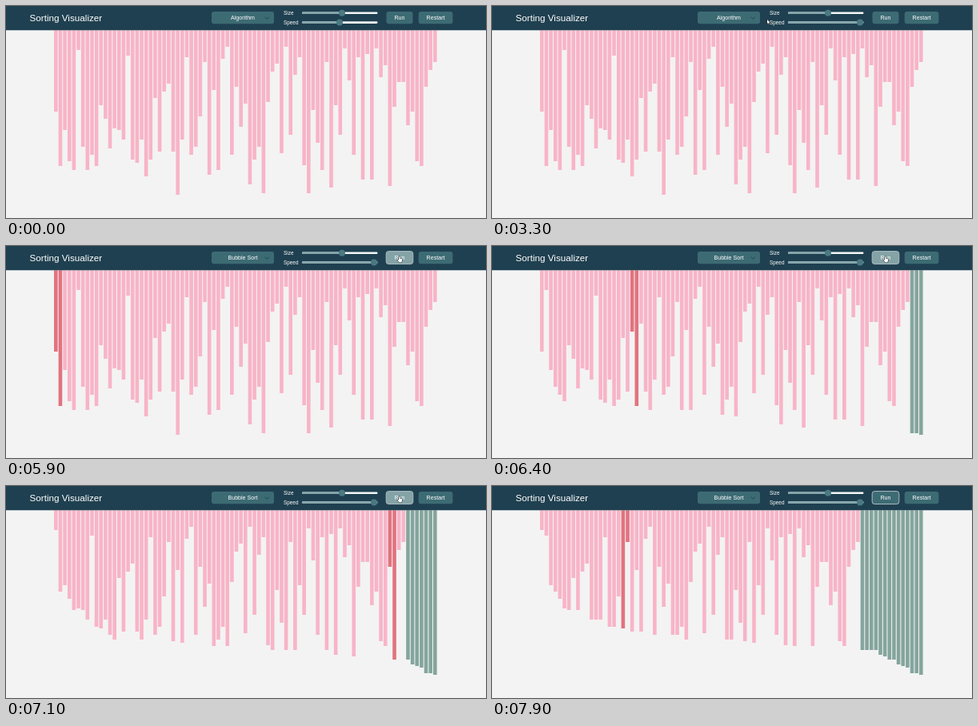
These frames come from a looping animation (600x265 px, 8 s). An HTML page with a canvas:

```html
<!DOCTYPE html>
<html lang="en">
<head>
<meta charset="utf-8">
<title>Sorting Visualizer</title>
<style>
html, body { margin: 0; width: 600px; height: 265px; overflow: hidden; background: #f3f3f3; }
canvas { display: block; width: 600px; height: 265px; }
</style>
</head>
<body>
<canvas id="stage"></canvas>
<script>
const W = 600, H = 265, LOOP = 8000, TICK = 100;
const TOP = 30.3, LEFT = 60, PITCH = 5.643, BAR = 4.6;
const FONT = '"Liberation Sans", Arial, sans-serif';
const C = {
  page: '#f3f3f3', header: '#1f4050', button: '#3d6b74', hover: '#84a3a6',
  bar: '#f8b4c8', active: '#e2737f', sorted: '#84a59d',
  track: '#f4f6f6', fill: '#86a5ab', knob: '#4a7982', white: '#ffffff'
};

// Lower edge of every bar before sorting
const START = [
  132, 200, 155, 194, 205, 55, 176, 205, 186, 200, 124, 141, 178, 153, 155, 167, 62,
  192, 196, 167, 213, 192, 115, 182, 107, 97, 182, 236, 167, 64, 186, 176, 138, 70,
  211, 105, 205, 66, 51, 186, 101, 151, 122, 223, 192, 176, 234, 120, 82, 72, 184,
  51, 161, 86, 64, 199, 234, 130, 171, 205, 70, 227, 124, 161, 53, 93, 186, 64,
  217, 60, 217, 53, 89, 74, 225, 126, 95, 95, 149, 132, 194, 200, 101, 80, 70
];

// Keys are [time, value, ...]; a half step means the pair is already swapped
const STEPS = [[5900, 0], [6400, 269.5], [7100, 641.5], [7900, 1103]];
const SPEED = [[2000, 417], [2600, 460]];
const POINTER = [
  [800, 410, 2], [1100, 369, 6], [1500, 395, 13], [1900, 417, 20], [2000, 417, 20],
  [2600, 460, 20], [2800, 450, 20], [3300, 344, 17], [3700, 322, 15], [4000, 320, 16],
  [4400, 318, 37], [4600, 317.5, 37.5], [5000, 400, 31], [5500, 491, 13], [7300, 491, 13],
  [7600, 500, -10]
];

const canvas = document.getElementById('stage');
const ctx = canvas.getContext('2d');
const dpr = window.devicePixelRatio || 1;
canvas.width = W * dpr;
canvas.height = H * dpr;

function track(keys, t, col = 1) {
  if (t <= keys[0][0]) return keys[0][col];
  for (let i = 1; i < keys.length; i++) {
    const a = keys[i - 1], b = keys[i];
    if (t <= b[0]) return a[col] + (b[col] - a[col]) * (t - a[0]) / (b[0] - a[0]);
  }
  return keys[keys.length - 1][col];
}

function bubble(steps) {
  const bars = START.slice();
  let left = Math.floor(steps), end = bars.length - 1;
  const compare = j => {
    if (bars[j] > bars[j + 1]) [bars[j], bars[j + 1]] = [bars[j + 1], bars[j]];
  };
  while (left >= end && end > 1) {
    for (let j = 0; j < end; j++) compare(j);
    left -= end--;
  }
  for (let j = 0; j < left; j++) compare(j);
  if (steps % 1 >= 0.5) compare(left);
  return { bars, at: left, end };
}

function box(x, y, w, h, r, color) {
  ctx.fillStyle = color;
  ctx.beginPath();
  ctx.roundRect(x, y, w, h, r);
  ctx.fill();
}

function text(str, x, y, size, align = 'left') {
  ctx.font = `${size}px ${FONT}`;
  ctx.textAlign = align;
  ctx.fillStyle = C.white;
  ctx.fillText(str, x, y);
}

function button(label, x, w, color = C.button) {
  box(x, 7, w, 15.3, 3, color);
  text(label, x + w / 2, 17.2, 7.1, 'center');
}

function slider(label, y, x) {
  text(label, 347, y + 2.2, 6.4);
  box(370, y - 1.3, 94.5, 2.6, 1.3, C.track);
  box(370, y - 1.3, x - 370, 2.6, 1.3, C.fill);
  ctx.fillStyle = C.knob;
  ctx.beginPath();
  ctx.arc(x, y, 4, 0, Math.PI * 2);
  ctx.fill();
}

function shape(x, y, points) {
  ctx.beginPath();
  for (const [px, py] of points) ctx.lineTo(x + px, y + py);
  ctx.closePath();
  ctx.lineWidth = 0.9;
  ctx.lineJoin = 'round';
  ctx.strokeStyle = '#111';
  ctx.stroke();
  ctx.fillStyle = C.white;
  ctx.fill();
}

const ARROW = [[0, 0], [0, 5], [1.1, 4], [1.9, 5.8], [2.7, 5.4], [1.9, 3.7], [3.5, 3.6]];
const HAND = [[0, 0.4], [0.6, 0], [1.2, 0.4], [1.2, 2.6], [4, 3.2], [4, 5.8],
  [3.2, 7.6], [0.4, 7.6], [-1.6, 4.4], [-0.8, 4], [0, 4.8]];

function drawBars(t) {
  const running = t >= STEPS[0][0];
  const state = running ? bubble(track(STEPS, t)) : { bars: START, at: -9, end: START.length };
  state.bars.forEach((bottom, i) => {
    const active = i === state.at || i === state.at + 1;
    ctx.fillStyle = active ? C.active : i > state.end ? C.sorted : C.bar;
    ctx.fillRect(LEFT + i * PITCH, TOP, BAR, bottom - TOP);
  });
}

function drawHeader(t, over) {
  ctx.fillStyle = C.header;
  ctx.fillRect(0, 0, W, TOP);
  text('Sorting Visualizer', 29.5, 19, 11.7);

  button(t < 4400 ? 'Algorithm' : 'Bubble Sort', 257, 78);
  ctx.strokeStyle = '#1f4050';
  ctx.lineWidth = 0.9;
  ctx.beginPath();
  ctx.moveTo(323.6, 13.8);
  ctx.lineTo(326.2, 16.2);
  ctx.lineTo(328.8, 13.8);
  ctx.stroke();

  slider('Size', 8.7, 420);
  slider('Speed', 20.6, track(SPEED, t));
  button('Run', 475.5, 33, over ? C.hover : C.button);
  if (t >= 5800) {
    ctx.lineWidth = 0.8;
    ctx.strokeStyle = '#d5dfe1';
    ctx.beginPath();
    ctx.roundRect(475.2, 6.6, 33.6, 16, 3);
    ctx.stroke();
  }
  button('Restart', 515.7, 42.7);
}

function draw(t) {
  const over = t >= 5500 && t < 7400;
  ctx.setTransform(dpr, 0, 0, dpr, 0, 0);
  ctx.fillStyle = C.page;
  ctx.fillRect(0, 0, W, H);
  drawBars(t);
  drawHeader(t, over);
  if (t >= 800 && t < 7600) {
    shape(track(POINTER, t), track(POINTER, t, 2), over ? HAND : ARROW);
  }
}

const began = performance.now();
function loop() {
  const t = (performance.now() - began) % LOOP;
  draw(Math.floor(t / TICK) * TICK);
  requestAnimationFrame(loop);
}
loop();
</script>
</body>
</html>
```
